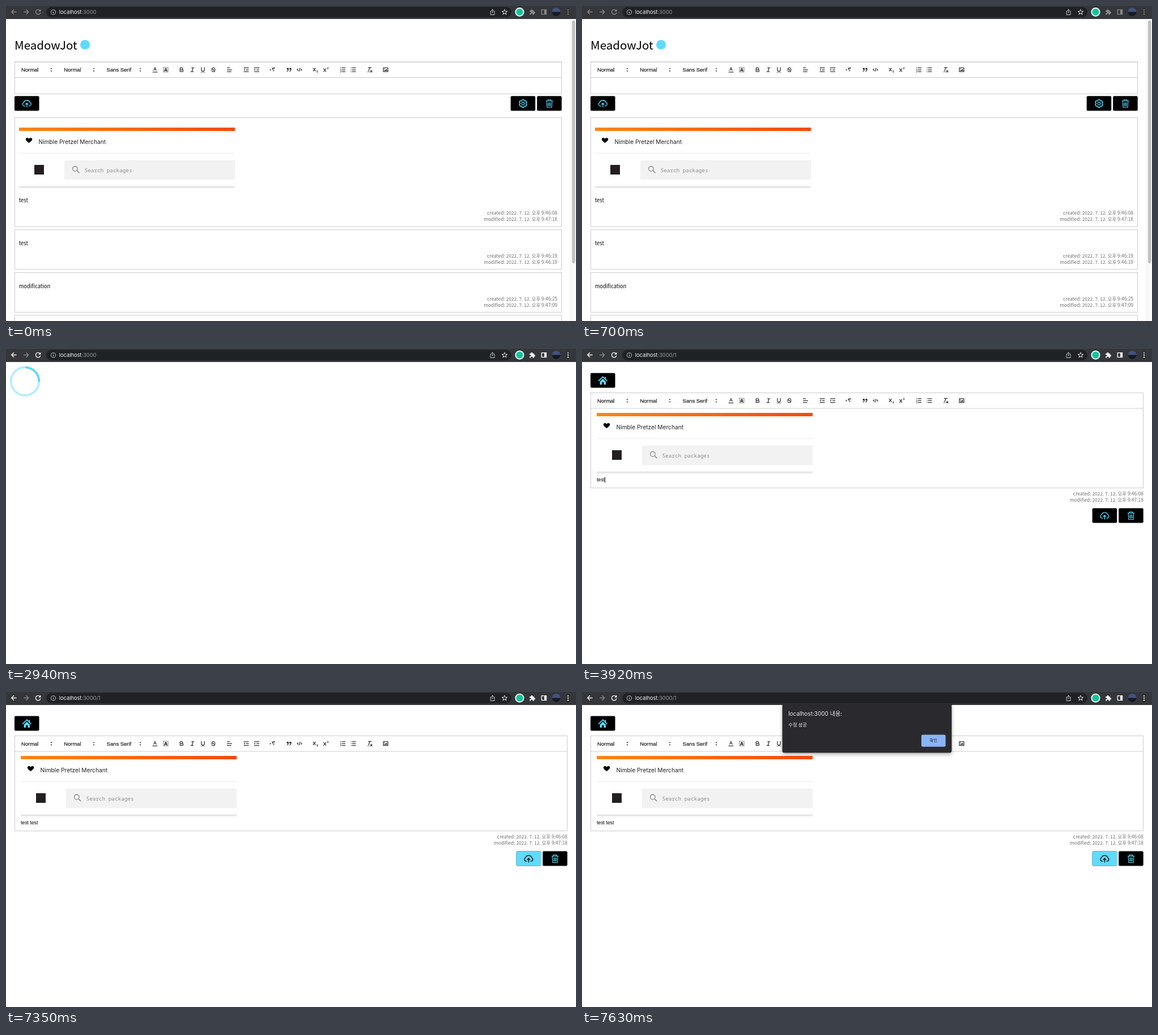
An HTML page that plays this animation: 1006x557 px, repeating every 8000 ms.

```html
<!DOCTYPE html>
<html lang="en">
<head>
<meta charset="utf-8">
<title>Memo editor</title>
<style>
html, body { margin: 0; width: 100%; height: 100%; overflow: hidden; background: #fff; }
svg { display: block; }
text { font-family: "Noto Sans CJK KR", "Noto Sans", sans-serif; white-space: pre; }
.ui { font-family: Inter, "Noto Sans CJK KR", sans-serif; }
.edit { font-family: "Liberation Sans", sans-serif; }
.mono { font-family: "Noto Sans Mono", monospace; }
.line { fill: none; stroke: currentColor; }
.solid { fill: currentColor; stroke: none; }
.tool { color: #333; stroke-width: 1.9; stroke-linecap: round; stroke-linejoin: round; }
.box { fill: none; stroke: #ccc; }
</style>
</head>
<body>
<svg id="stage" width="1006" height="557" viewBox="0 0 1006 557"></svg>
<script>
const CYAN = '#61dafb';
const LOOP = 8000;

const text = (x, y, size, str, attrs = '') =>
  `<text x="${x}" y="${y}" font-size="${size}" ${attrs}>${str}</text>`;
const rect = (x, y, w, h, attrs = '') =>
  `<rect x="${x}" y="${y}" width="${w}" height="${h}" ${attrs}/>`;
const disc = (x, y, r, attrs = '') => `<circle cx="${x}" cy="${y}" r="${r}" ${attrs}/>`;
const line = (d, attrs = '') => `<path class="line" d="${d}" ${attrs}/>`;
const solid = (d, attrs = '') => `<path class="solid" d="${d}" ${attrs}/>`;
const at = (x, y, body, attrs = '') => `<g transform="translate(${x} ${y})" ${attrs}>${body}</g>`;

// Editor toolbar icons on an 18 unit grid: [centre x, drawing]
const letterA = 'M5.5 11 9 3 12.5 11M11.6 9H6.4';
const small2 = 'q1.4-1.6 2.6-.3q.7 1.2-2.6 3.6h2.9';
const arrows = solid('M6.5 11h5L9 14zM6.5 7h5L9 4z');
const tools = [
  [80, arrows], [155, arrows], [237, arrows],
  [263, line(letterA, 'stroke-width="1.5"') + line('M3 15H15')],
  [282, rect(2.5, 2.5, 13, 13, 'fill="#ddd" stroke="#777" stroke-width="1.2" stroke-dasharray="1 2"') +
    line('M5.5 13 9 5 12.5 13M11.6 11H6.4')],
  [310, line('M5 4H9.5A2.5 2.5 0 0 1 9.5 9H5ZM5 9H10.5A2.5 2.5 0 0 1 10.5 14H5Z')],
  [329, line('M7 4H13M5 14H11M8 14 10 4')],
  [347.5, line('M5 3V9A4 4 0 0 0 13 9V3') + solid('M3 15H15V16H3Z')],
  [366, line('M12.9 6C12.4 3.2 5 3.2 5 6.5C5 9.5 13 8.5 13 11.5C13 14.8 5.6 14.8 5.1 12') +
    line('M2.5 9.5 15.5 8.5', 'stroke-width="1"')],
  [394.5, line('M3 9H15M3 14H13M3 4H9')],
  [424, line('M3 14H15M3 4H15M9 9H15') + solid('M5.6 6.2V11.8L2.4 9z')],
  [442.5, line('M3 14H15M3 4H15M9 9H15') + solid('M2.6 6.2V11.8L5.8 9z')],
  [470, solid('M2.6 6.2V11.8L5.8 9zM11 3A3 3 0 0 0 11 9H12V3zM11 3H16V5H11zM11 4H12V13H11zM13 4H14V13H13z')],
  [499.5, solid('M3.2 4.2H8V8.5H3.2zM10.2 4.2H15V8.5H10.2z') + line('M7 8C7 12 4 13 4 13M14 8C14 12 11 13 11 13')],
  [518, line('M5 7 3 9 5 11M13 7 15 9 13 11M10 5 8 13')],
  [546.5, line('M2.5 4.5 8.5 12M8.5 4.5 2.5 12') + line('M12 12' + small2, 'stroke-width="1.3"')],
  [565, line('M2.5 6 8.5 13.5M8.5 6 2.5 13.5') + line('M12 3' + small2, 'stroke-width="1.3"')],
  [594.5, line('M7 4H15M7 9H15M7 14H15') +
    line('M2.5 2.8 3.5 2.3V5.5M2.5 8q2-.8 1.6.6L2.5 10.5H4.5M2.5 13H4.3L3.3 14Q5.5 15.5 2.5 16', 'stroke-width="1"')],
  [613, line('M6 4H15M6 9H15M6 14H15M3 4H3M3 9H3M3 14H3')],
  [642, line('M5 3H13M6 12 9.3 3M11 11 15 15M15 11 11 15') + solid('M2 14H9V15H2z')],
  [670, rect(3, 4, 12, 10, 'class="line"') + disc(6, 7, 1, 'class="solid"') +
    solid('M5 12V11L7 9 8 10 11 7 13 9V12z')]
];

function editor(y, right, bottom) {
  const label = (x, str) => text(x, y + 17, 9.45, str,
    'class="edit" fill="#222" stroke="#222" stroke-width=".22"');
  return rect(15.5, y, right - 15.5, 27.5, 'class="box"') +
    rect(15.5, y, right - 15.5, bottom - y, 'class="box"') +
    label(27, 'Normal') + label(102.3, 'Normal') + label(177.6, 'Sans Serif') +
    tools.map(([x, icon]) =>
      `<g class="tool" transform="translate(${x - 6} ${y + 7.8}) scale(.667)">${icon}</g>`).join('');
}

// Button icons, centred on the origin
function gearPath() {
  const pts = [];
  for (let k = 0; k < 6; k++)
    for (const [off, r] of [[-22, 5.3], [-15, 7.1], [15, 7.1], [22, 5.3]]) {
      const a = (60 * k - 90 + off) * Math.PI / 180;
      pts.push(`${(r * Math.cos(a)).toFixed(2)} ${(r * Math.sin(a)).toFixed(2)}`);
    }
  return `M${pts.join('L')}Z`;
}
const icons = {
  upload: line('M-3 4.4H-4.8A3.2 3.2 0 0 1-5.5-1.7A5.8 5.8 0 0 1 5.5-1.7A3.2 3.2 0 0 1 4.8 4.4H3M0 6.8V-.6M-2.6 2 0-.7 2.6 2'),
  gear: line(gearPath(), 'stroke-linejoin="round"') + disc(0, 0, 2.4, 'class="line"'),
  trash: line('M-6-4.6H6M-2.6-4.8V-6.7H2.6V-4.8M-4.8-4.4-4.2 6.8H4.2L4.8-4.4M-2-2V4.8M0-2V4.8M2-2V4.8', 'stroke-width="1.1"'),
  home: solid('M-5.2 2 0-3.2 5.2 2V7.3H1.7V3H-1.7V7.3H-5.2zM3.4-6.2H5.4V-1L3.4-3z') +
    line('M-7.6.8 0-6.6 7.6.8', 'stroke-width="1.7"')
};
const button = (x, y, icon, fill = '#000', color = CYAN) =>
  rect(x, y, 43.5, 26, `rx="2" fill="${fill}"`) +
  at(x + 21.8, y + 13.2, icons[icon], `color="${color}" stroke-width="1.3"`);

const stamps = (right, y, made, changed) =>
  [['created', made], ['modified', changed]].map(([name, time], i) =>
    text(right, y + i * 10.6, 8.4, `${name}: 2022. 7. 12. 오후 ${time}`,
      'text-anchor="end" fill="#707070"')).join('');

const banner = (x, y) => at(x, y,
  rect(0, 0, 381, 6, 'fill="url(#orange)"') +
  solid('M17.5 27.3C14 24.6 11.8 22.8 11.8 20.6C11.8 17.6 16 17.2 17.5 19.9C19 17.2 23.3 17.6 23.3 20.6C23.3 22.8 21 24.6 17.5 27.3Z') +
  text(34.5, 28.9, 10.2, 'Nimble Pretzel Merchant', 'class="ui" fill="#222"') +
  rect(0, 44.7, 381, 1, 'fill="#ececec"') +
  rect(27, 66, 17, 17, 'fill="#231f20"') +
  rect(79.7, 57.7, 301.3, 34.3, 'fill="#f2f2f2"') +
  disc(98.8, 72.8, 4.3, 'class="line" color="#888" stroke-width="1.3"') +
  line('M102 76 106.5 80.3', 'color="#888" stroke-width="1.5"') +
  text(115.6, 78.8, 9.33, 'Search packages', 'class="mono" fill="#8c8c8c"') +
  rect(0, 104, 381, 1, 'fill="#d2d2d2"') + rect(0, 105, 381, 2.5, 'fill="#efefef"'));

const card = (y, h, label, ...times) =>
  rect(15.5, y, 965, h, 'class="box"') +
  text(22.7, y + h - 43, 9.35, label) + stamps(973, y + h - 20.6, ...times);

const browser =
  rect(0, 0, 1006, 23, 'fill="#35363a"') + rect(71, 1.5, 821, 18.5, 'rx="9.2" fill="#202124"') +
  `<g id="controls" stroke-width="1.4">` +
    line('M18.5 10.5H10M14 6.3 9.8 10.5 14 14.7') +
    line('M60.2 8.3A4.2 4.2 0 1 0 60.8 11.3') + solid('M61.4 5.6V9.8H57.2z') +
    solid('M924 8H926.4A1.7 1.7 0 1 1 929.7 8H932V10.3A1.6 1.6 0 1 1 932 13.4V15.5H929.5A1.6 1.6 0 1 0 926.5 15.5H924V13A1.6 1.6 0 1 0 924 10.2z') +
    rect(945.3, 6.7, 8.2, 7.8, 'class="line"') + solid('M950 6.5H953.7V14.5H950z') +
    [7, 10.7, 14.4].map(y => disc(992, y, 1.1, 'class="solid"')).join('') +
  '</g>' +
  line('M31 10.5H39.5M35.5 6.3 39.7 10.5 35.5 14.7', 'color="#85888c" stroke-width="1.3"') +
  '<g color="#c4c7cb">' + disc(83.5, 10.8, 4.1, 'class="line"') +
    line('M83.5 10.2V13.2M83.5 8.3V9.3') +
    line('M856.8 9H855.2V15.5H862V9H860.4M858.6 12.6V6.2M856.4 8.2 858.6 6 860.8 8.2') +
    line('M880 6.2 881.3 9.1 884.4 9.4 882 11.5 882.8 14.7 880 13 877.2 14.7 878 11.5 875.6 9.4 878.7 9.1Z', 'stroke-width="1.1"') +
  '</g>' +
  disc(906.5, 10.7, 8, 'fill="#fff"') + disc(906.5, 10.7, 6.2, 'fill="#15c39a"') +
  disc(971, 10.5, 7.5, 'fill="#41527f"') + solid('M963.5 10.5H978.5A7.5 7.5 0 0 1 963.5 10.5Z', 'color="#17191f"') +
  text(93.7, 14.1, 9.3, 'localhost<tspan fill="#9aa0a6">:3000<tspan id="path"></tspan></tspan>', 'class="ui" fill="#f1f3f4"');

const list =
  text(15, 77, 20.5, 'MeadowJot', 'font-weight="500"') + disc(139.5, 68.5, 8.5, `fill="${CYAN}"`) +
  editor(99, 980.5, 155.5) +
  button(15, 159.2, 'upload') + button(890.7, 159.2, 'gear') + button(937.2, 159.2, 'trash') +
  card(197.5, 192.5, 'test', '9:46:08', '9:47:18') + banner(23, 215) +
  card(395.5, 70, 'test', '9:46:19', '9:46:19') +
  card(471.5, 70, 'modification', '9:46:25', '9:47:09') +
  rect(15.5, 546.8, 965, 70, 'class="box"') +
  rect(997, 23, 9, 534, 'fill="#fafafa"') + rect(996.5, 23, .7, 534, 'fill="#e6e6e6"') +
  rect(999, 25.5, 5.5, 429.5, 'rx="2.7" fill="#c1c1c1"');

const spinner = disc(33.5, 57.2, 24.8, 'fill="none" stroke="#b5edfc" stroke-width="3.8"') +
  line('M34.2 32.4A24.8 24.8 0 0 1 58.3 58', `color="${CYAN}" stroke-width="3.8"`);

const detail =
  button(15, 42.6, 'home') + editor(77.5, 990.5, 245.7) + banner(26, 113) +
  text(25.9, 234.2, 8.7, '', 'id="typed" class="edit"') +
  rect(0, 226.3, .9, 10, 'id="caret"') +
  stamps(990.8, 259.4, '9:46:08', '9:47:18') +
  button(900.6, 281.5, 'upload') +
  `<g id="hover">${button(900.6, 281.5, 'upload', CYAN, '#000')}</g>` +
  button(947.2, 281.5, 'trash');

const dialog =
  '<path d="M353.5 21H652.5V103.5A4 4 0 0 1 648.5 107.5H357.5A4 4 0 0 1 353.5 103.5Z" fill="#292a2d" filter="url(#shadow)"/>' +
  text(364.2, 41.8, 10, 'localhost:3000 내용:', 'class="ui" fill="#e8eaed"') +
  text(364.2, 61, 8.45, '수정 성공', 'fill="#e8eaed"') +
  rect(599, 75.5, 42.7, 21.3, 'rx="2.5" fill="#8ab4f8"') +
  text(620.3, 88.4, 7.4, '확인', 'text-anchor="middle" fill="#202124" font-weight="500"');

const $ = id => document.getElementById(id);
$('stage').innerHTML =
  `<defs>
    <linearGradient id="orange"><stop stop-color="#fb8817"/><stop offset="1" stop-color="#f54a0a"/></linearGradient>
    <filter id="shadow"><feDropShadow dx="0" dy="3" stdDeviation="3" flood-opacity=".3"/></filter>
  </defs>` + browser +
  `<g id="list">${list}</g><g id="spinner">${spinner}</g><g id="detail">${detail}</g><g id="dialog">${dialog}</g>`;

const keyTimes = [5040, 5390, 5530, 5670, 5810];
const caretX = [40, 42.3, 44.7, 49.5, 53.9, 56.3];
const caretOn = [[3920, 4410], [4970, 6300], [6860, 7350]];
const show = (id, on) => $(id).style.display = on ? '' : 'none';

function draw(now) {
  const t = now % LOOP;
  const keys = keyTimes.filter(k => t >= k).length;
  $('controls').setAttribute('color', t < 2170 ? '#85888c' : '#f1f3f4');
  $('path').textContent = t < 3010 ? '' : '/1';
  show('list', t < 2940);
  show('spinner', t >= 2940 && t < 3010);
  show('detail', t >= 3010);
  $('typed').textContent = 'test test'.slice(0, 4 + keys);
  $('caret').setAttribute('x', caretX[keys]);
  show('caret', caretOn.some(([a, b]) => t >= a && t < b));
  show('hover', t >= 7140);
  show('dialog', t >= 7560);
  $('dialog').setAttribute('opacity', t < 7630 ? .6 : 1);
}

let start;
function tick(now) {
  start ??= now;
  draw(now - start);
  requestAnimationFrame(tick);
}
draw(0);
requestAnimationFrame(tick);
</script>
</body>
</html>
```
